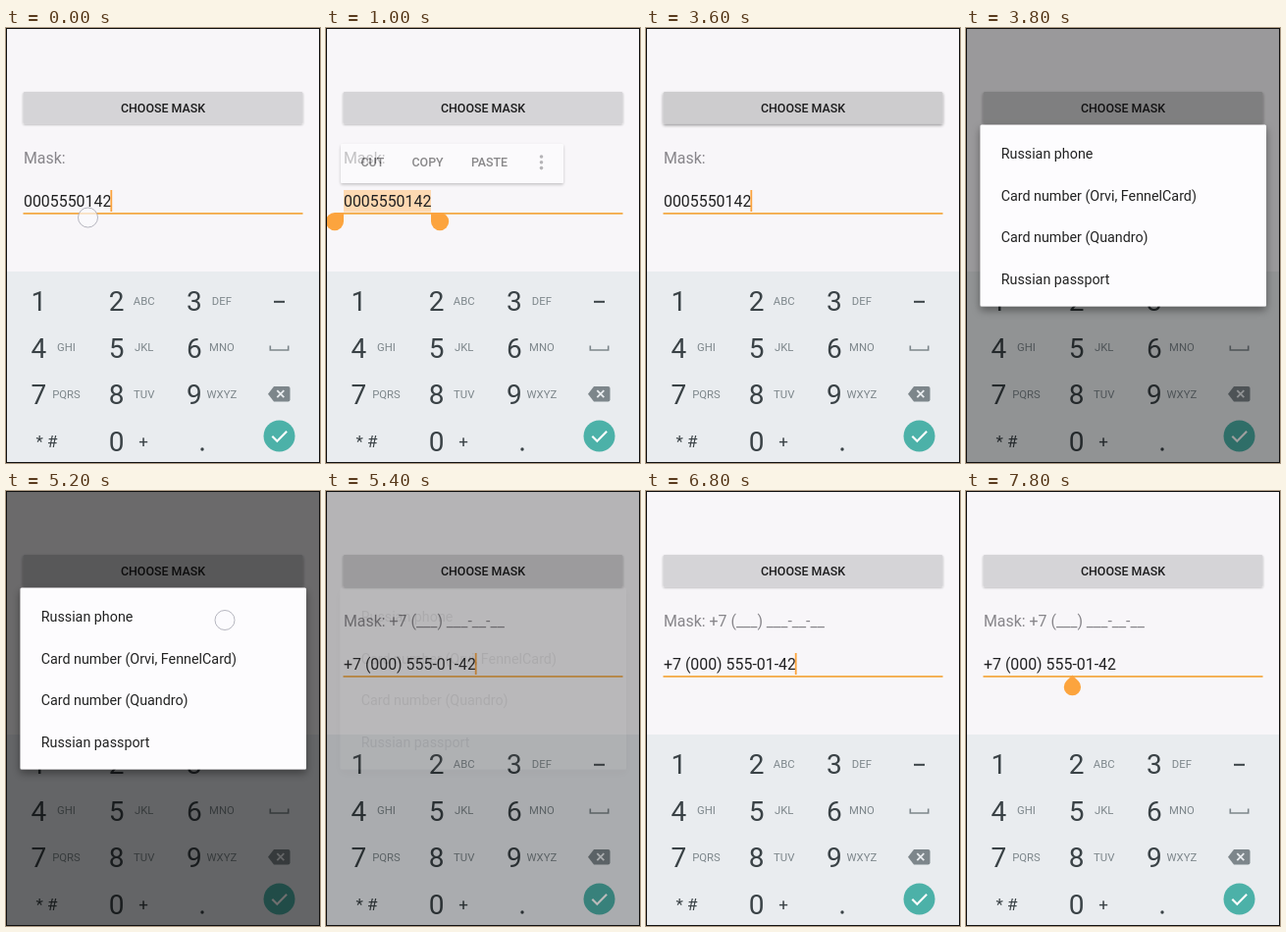
An HTML page for the animation above (8 s loop, 320 px wide and 443 px high).

```html
<!DOCTYPE html>
<html lang="en">
<head>
<meta charset="utf-8">
<title>Input mask demo</title>
<style>
  html, body { margin: 0; width: 100%; height: 100%; overflow: hidden; background: #f8f6f9; }
  svg { display: block; width: 100vw; height: 100vh; font-family: Roboto, Arial, sans-serif; }
  text { white-space: pre; }
  .label { font-size: 12.4px; font-weight: 500; fill: #1d1d1e; }
  .field { font-size: 15.9px; }
  .item { font-size: 14.3px; fill: #222; }
  .digit { font-size: 28px; fill: #3a4246; }
  .letters { font-size: 11.3px; fill: #7d868b; text-anchor: middle; }
  .sign { font-size: 17px; fill: #3a4246; text-anchor: middle; }
  .accent { fill: #fca43e; }
</style>
</head>
<body>
<svg viewBox="0 0 320 443" preserveAspectRatio="none">
  <defs>
    <filter id="low" x="-10%" y="-30%" width="120%" height="180%">
      <feDropShadow dx="0" dy="1" stdDeviation="0.9" flood-opacity=".3"/>
    </filter>
    <filter id="mid" x="-10%" y="-30%" width="120%" height="180%">
      <feDropShadow dx="0" dy="1.6" stdDeviation="1.7" flood-opacity=".42"/>
    </filter>
    <filter id="high" x="-10%" y="-10%" width="120%" height="125%">
      <feDropShadow dx="0" dy="4" stdDeviation="4" flood-opacity=".4"/>
    </filter>
    <path id="drop" d="M0 0H9.1A9.1 9.1 0 1 1 0 9.1Z"/>
  </defs>

  <rect width="320" height="443" fill="#f8f6f9"/>
  <rect id="button" x="17.5" y="65" width="285" height="32.5" rx="1.5"/>
  <text class="label" x="160" y="85.5" text-anchor="middle">CHOOSE MASK</text>

  <text id="mask" class="field" x="18" y="137.5" fill="#87858a"></text>
  <rect id="highlight" x="18" y="165" width="89" height="22.5" fill="#fdd9b2"/>
  <text id="value" class="field" x="18" y="182" fill="#212122"></text>
  <rect x="17.5" y="188" width="285" height="1.8" fill="#f4ab47"/>
  <rect id="cursor" class="accent" y="165" width="1.8" height="22"/>

  <g id="handles" class="accent">
    <use href="#drop" transform="translate(18 188) scale(-1 1)"/>
    <use href="#drop" transform="translate(107 188)"/>
  </g>
  <use id="caret" class="accent" href="#drop" transform="translate(108.4 187.5) rotate(45) scale(.95)"/>

  <g id="popup">
    <rect x="15" y="118" width="227" height="40" rx="1.5" fill="#fff" filter="url(#mid)"/>
    <text class="label" x="35.5" y="141.3">CUT</text>
    <text class="label" x="87.5" y="141.3">COPY</text>
    <text class="label" x="148" y="141.3">PASTE</text>
    <g fill="#757477">
      <circle cx="219.5" cy="131" r="1.8"/>
      <circle cx="219.5" cy="136.8" r="1.8"/>
      <circle cx="219.5" cy="142.6" r="1.8"/>
    </g>
  </g>

  <rect y="248" width="320" height="195" fill="#e9ecef"/>
  <g id="keys"></g>
  <text class="sign" x="41.5" y="427">* #</text>
  <text class="sign" x="140" y="427">+</text>
  <circle cx="200" cy="429" r="1.7" fill="#3a4246"/>
  <path d="M273 278.8h11" stroke="#3a4246" stroke-width="2"/>
  <path d="M269.3 323.5v4.5h18.4v-4.5" fill="none" stroke="#7d868b" stroke-width="1.6"/>
  <path d="M267 372.7l6-7.7h14.5q2 0 2 2v11.5q0 2-2 2H273z" fill="#7d868b"/>
  <path d="M276.3 369.2l7 7m0-7l-7 7" stroke="#e9ecef" stroke-width="1.8"/>
  <circle cx="278.5" cy="415.5" r="16" fill="#4cb1a8"/>
  <path d="M271.3 415.8l5 5 9.8-10" fill="none" stroke="#fff" stroke-width="2.1"/>

  <rect id="dim" width="320" height="443"/>
  <g id="dialog">
    <rect x="14.5" y="98.5" width="291.5" height="185" rx="1.5" fill="#fdfcfe" filter="url(#high)"/>
    <g id="items"></g>
  </g>
  <circle id="touch" r="10" fill="#fafafd" fill-opacity=".68" stroke="#aaaab4" stroke-opacity=".85"/>
  <rect x=".5" y=".5" width="319" height="442" fill="none" stroke="#111"/>
</svg>
<script>
const LOOP = 8000, STEP = 100;
const el = id => document.getElementById(id);
const within = (t, from, to) => t >= from && t < to;
const set = (id, attrs) => {
  for (const [name, value] of Object.entries(attrs)) el(id).setAttribute(name, value);
};
const fade = (id, opacity) => set(id, { opacity });

// Piecewise linear value through [time, value] points.
function ramp(t, points) {
  if (t <= points[0][0]) return points[0][1];
  for (let i = 1; i < points.length; i++) {
    const [t0, v0] = points[i - 1], [t1, v1] = points[i];
    if (t <= t1) return v0 + (v1 - v0) * (t - t0) / (t1 - t0);
  }
  return points[points.length - 1][1];
}

const letters = ['', 'ABC', 'DEF', 'GHI', 'JKL', 'MNO', 'PQRS', 'TUV', 'WXYZ'];
el('keys').innerHTML = letters.map((word, i) => {
  const x = 25.5 + i % 3 * 79.2, y = 288.3 + Math.floor(i / 3) * 47.4;
  return `<text class="digit" x="${x}" y="${y}">${i + 1}</text>` +
    `<text class="letters" x="${x + 36}" y="${y - 6.3}">${word}</text>`;
}).join('') + '<text class="digit" x="104.7" y="430.5">0</text>';

const choices = ['Russian phone', 'Card number (Orvi, FennelCard)', 'Card number (Quandro)', 'Russian passport'];
el('items').innerHTML = choices.map((name, i) =>
  `<text class="item" x="35.7" y="${132.8 + i * 42.8}">${name}</text>`).join('');

// Start, end, x, y of each touch.
const touches = [
  [0, 600, 83.5, 193],
  [2300, 2500, 109.5, 138.5],
  [3200, 3400, 241, 76.5],
  [5100, 5300, 223, 131.5],
  [7200, 7400, 108, 187]
];

function cursorX(t) {
  if (t < 100 || within(t, 2600, 5300)) return 106.4;
  if (within(t, 5300, 5500) || within(t, 6000, 6300) || within(t, 6800, 7300)) return 151.8;
  return within(t, 7300, 7800) ? 107.5 : null;
}

function draw(t) {
  const masked = t >= 5300, pressed = within(t, 3400, 5300);
  el('mask').textContent = masked ? 'Mask: +7 (___) ___-__-__' : 'Mask:';
  el('value').textContent = masked ? '+7 (000) 555-01-42' : '0005550142';
  set('button', {
    fill: pressed ? '#cdccce' : '#d5d4d7',
    filter: `url(#${pressed ? 'mid' : 'low'})`
  });

  const x = cursorX(t);
  set('cursor', { x: x ?? 0, opacity: x === null ? 0 : 1 });
  fade('highlight', within(t, 100, 2600) ? 1 : 0);
  fade('handles', ramp(t, [[500, 0], [800, 1], [2500, 1], [2700, 0]]));
  fade('caret', ramp(t, [[7300, 0], [7500, 1]]));
  fade('popup', ramp(t, [[900, 0], [1100, 1], [2500, 1], [2800, 0]]));
  fade('dim', ramp(t, [[3600, 0], [3900, .57], [5200, .57], [5300, .45], [5400, .27], [5500, 0]]));
  fade('dialog', ramp(t, [[3600, 0], [3800, 1], [5200, 1], [5300, .5], [5400, .06], [5500, 0]]));

  const touch = touches.find(([from, to]) => within(t, from, to));
  set('touch', touch ? { cx: touch[2], cy: touch[3], opacity: 1 } : { opacity: 0 });
}

const start = performance.now();
function tick() {
  const t = (performance.now() - start) % LOOP;
  draw(Math.floor(t / STEP) * STEP);
  requestAnimationFrame(tick);
}
tick();
</script>
</body>
</html>
```
